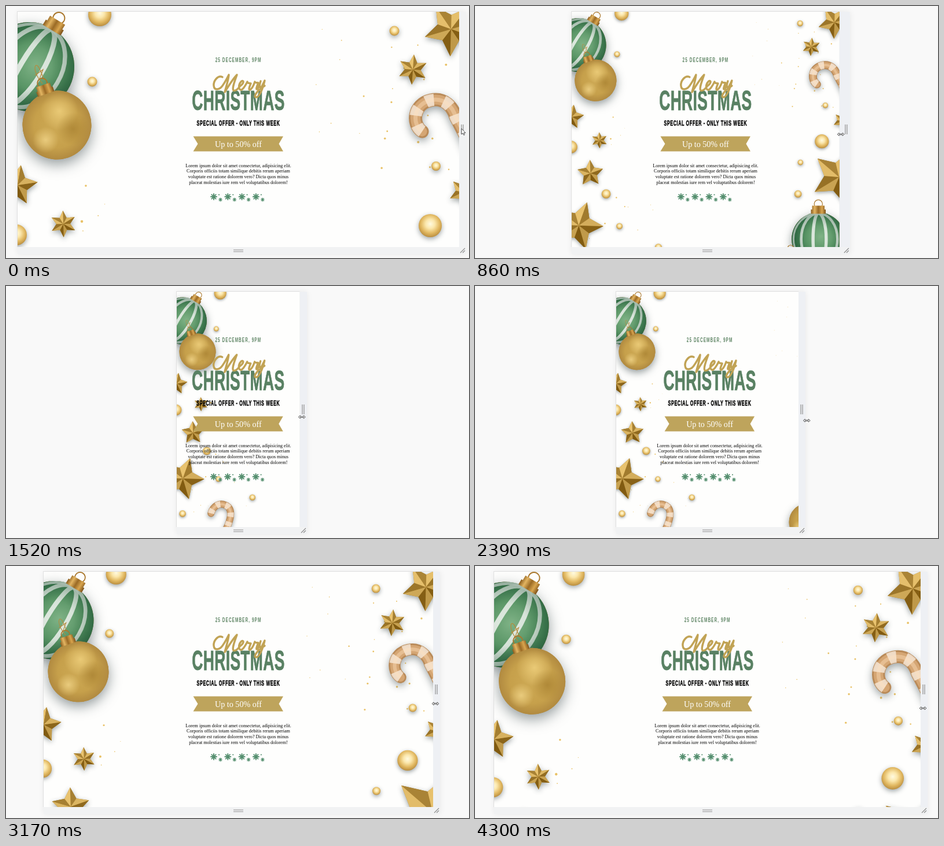
Recreate the animation shown at these times as an HTML page with a canvas. Size 800x436 px, loop 4340 ms.

```html
<!DOCTYPE html>
<html lang="en">
<head>
<meta charset="utf-8">
<title>Responsive Christmas flyer</title>
<style>
  html, body { margin: 0; width: 100%; height: 100%; overflow: hidden; background: #f9f9f9; }
  canvas, svg { position: absolute; left: 0; top: 0; }
  .condensed { font-family: "Liberation Sans", Arial, sans-serif; font-weight: bold; }
  .serif { font-family: "Liberation Serif", "Times New Roman", serif; }
  text { text-anchor: middle; }
</style>
</head>
<body>
<canvas id="stage" width="800" height="436"></canvas>
<svg width="800" height="436">
  <defs>
    <path id="flower" d="M-5 0H5M0-5V5M-3.6-3.6 3.6 3.6M-3.6 3.6 3.6-3.6" stroke="#558f6f" stroke-width="2" stroke-linecap="round"/>
    <g id="sprig">
      <use href="#flower"/>
      <use href="#flower" transform="translate(11.5 5) scale(.58)"/>
      <circle cx="9" cy="-3.5" r="1.1" fill="#558f6f"/>
    </g>
    <g id="pair">
      <use href="#sprig"/>
      <use href="#sprig" x="24.3"/>
    </g>
  </defs>
  <g id="copy">
    <g class="condensed" transform="scale(.55 1)">
      <text y="97" font-size="11.6" letter-spacing="2" fill="#5c8362">25 DECEMBER, 9PM</text>
      <text y="180" font-size="48" letter-spacing=".7" fill="#598163" stroke="#598163">CHRISTMAS</text>
      <text y="207" font-size="13" letter-spacing="1.2" stroke="#000" stroke-width=".5">SPECIAL OFFER - ONLY THIS WEEK</text>
    </g>
    <path role="img" aria-label="Merry" transform="translate(-401.5)" fill="none" stroke="#c1a355" stroke-width="3.4" stroke-linecap="round" stroke-linejoin="round"
      d="M374 123C366 119 358 130 359 138C360 147 369 145 374 138C379 131 382 125 385 119C384 130 380 140 378 149C386 136 392 126 399 119C396 128 390 142 393 146C397 148 402 142 405 138C412 133 411 128 407 130C400 137 402 146 407 145C411 143 414 137 417 131C417 135 422 133 423 134C421 139 418 146 422 145C426 142 428 137 430 131C431 134 435 132 436 133C434 138 431 145 434 144C437 142 438 137 440 130C437 139 438 144 442 139L447 129C444 142 438 158 432 158C426 156 436 145 447 138"/>
    <path d="M-78 225.5H77.5L70 238.5L77.5 251.5H-78L-70 238.5Z" fill="#bea45c"/>
    <text class="serif" y="244" font-size="14.1" fill="#fff">Up to 50% off</text>
    <g class="serif" font-size="8.1">
      <text y="278.5">Lorem ipsum dolor sit amet consectetur, adipisicing elit.</text>
      <text y="288.3">Corporis officiis totam similique debitis rerum aperiam</text>
      <text y="297.9">voluptate est ratione dolorem vero? Dicta quos minus</text>
      <text y="307.6">placeat molestias iure rem vel voluptatibus dolorem!</text>
    </g>
    <use href="#pair" x="-42.5" y="330"/>
    <use href="#pair" x="6.1" y="330"/>
  </g>
</svg>
<script>
const ctx = document.getElementById('stage').getContext('2d');
const copy = document.getElementById('copy');
const LOOP = 4340, TOP = 10, BOTTOM = 417, TAU = Math.PI * 2;
const BASE = 763, MIN_ART = 404;  // the artwork scales with the page, down to a minimum width

// Left edge of the page while its handle is dragged: [time, x]
const DRAG = [[0, 20], [340, 20], [860, 167], [1520, 295], [1820, 300], [2170, 300],
  [2730, 158], [3170, 65], [3520, 65], [3860, 16.5], [4170, 16.5], [4300, 33], [LOOP, 33]];

function leftAt(t) {
  const i = DRAG.findIndex(k => k[0] >= t);
  if (i < 1) return DRAG[i ? DRAG.length - 1 : 0][1];
  const [t0, x0] = DRAG[i - 1], [t1, x1] = DRAG[i];
  return x0 + (x1 - x0) * (t - t0) / (t1 - t0);
}
const rightAt = t => 803 - leftAt(t);

let seed = 7;
const random = () => (seed = seed * 16807 % 2147483647) / 2147483647;

// Gold specks, denser and larger towards the side they drift from
function dust(count, x, y, spreadX, spreadY) {
  return Array.from({ length: count }, () => {
    const away = random() ** 1.4;
    return [x + spreadX * away, y + spreadY * random(), .6 + 2.4 * random() * (1 - away)];
  });
}
const DUST = [...dust(26, 745, 15, -250, 280), ...dust(16, 50, 530, 210, 190), ...dust(5, 110, 278, 65, 110)];

function shadow(strength, scale) {
  ctx.shadowColor = `rgba(40,55,60,${strength})`;
  ctx.shadowBlur = 14 * scale;
  ctx.shadowOffsetY = 5 * scale;
}

function disc(x, y, r, fill) {
  ctx.fillStyle = fill;
  ctx.beginPath();
  ctx.arc(x, y, r, 0, TAU);
  ctx.fill();
}

function spread(gradient, colors) {
  colors.forEach((c, i) => gradient.addColorStop(i / (colors.length - 1), c));
  return gradient;
}
const glow = (x, y, r, ...colors) => spread(ctx.createRadialGradient(x, y, 0, x, y, r), colors);

function spot(x, y, r, rgb, alpha) {
  disc(x, y, r, glow(x, y, r, `rgba(${rgb},${alpha})`, `rgba(${rgb},0)`));
}

function pearl(x, y, r, scale) {
  shadow(.45, scale * .6);
  disc(x, y, r, glow(x, y - r * .15, r * 1.2, '#fffae0', '#fbe7ac', '#e2b962', '#b5883a'));
  shadow(0, 0);
}

function star(x, y, r, turn, tips, scale) {
  const step = Math.PI / tips;
  const outline = Array.from({ length: tips * 2 }, (_, i) => {
    const a = turn + i * step, d = i % 2 ? r * .52 : r;
    return [x + Math.cos(a) * d, y + Math.sin(a) * d];
  });
  const poly = (points, fill) => {
    ctx.beginPath();
    points.forEach(p => ctx.lineTo(...p));
    ctx.closePath();
    ctx.fillStyle = fill;
    ctx.fill();
  };
  shadow(.45, scale * .7);
  poly(outline, '#b08430');
  shadow(0, 0);
  outline.forEach((p, i) => {
    const light = .48 + .2 * Math.cos(turn + i * step + 2.2) + (i % 2 ? .3 : -.3);
    poly([[x, y], p, outline[(i + 1) % outline.length]],
      `rgb(${130 + 105 * light},${92 + 105 * light},${18 + 95 * light})`);
  });
}

// The cap sits on top of a ball whose centre is the origin
function cap(r, w) {
  const h = w * .58;
  ctx.strokeStyle = '#a9772c';
  ctx.lineWidth = 2;
  ctx.beginPath();
  ctx.arc(0, -r - h, w * .28, 0, TAU);
  ctx.stroke();
  ctx.fillStyle = spread(ctx.createLinearGradient(-w / 2, 0, w / 2, 0),
    ['#8a5c1d', '#e3b562', '#9a6a25', '#d9a54e', '#7c5119']);
  ctx.fillRect(-w * .42, -r - h * .8, w * .84, h * .5);
  ctx.fillRect(-w / 2, -r - h * .35, w, h * .5);
}

function ornament(x, y, r, tilt, capWidth, scale, paint) {
  ctx.save();
  ctx.translate(x, y);
  ctx.rotate(tilt);
  shadow(.5, scale * 1.7);
  disc(0, 0, r, '#b48c40');
  shadow(0, 0);
  paint(r);
  cap(r, capWidth);
  ctx.restore();
}

function paintGreen(r) {
  disc(0, 0, r, glow(r * .1, -r * .1, r * 1.1, '#80b387', '#5c9868', '#2f6c45'));
  ctx.strokeStyle = 'rgba(238,243,238,.88)';
  for (let lon = -1.2; lon < 1.2; lon += .5) {
    ctx.lineWidth = r * .12 * Math.cos(lon * .8);
    ctx.beginPath();
    ctx.ellipse(0, 0, Math.abs(Math.sin(lon)) * r, r * .97, 0, -Math.PI / 2, Math.PI / 2, lon < 0);
    ctx.stroke();
  }
  disc(0, 0, r, glow(0, 0, r, 'rgba(20,70,40,0)', 'rgba(20,70,40,.03)', 'rgba(20,70,40,.35)'));
}

function paintGold(r) {
  disc(0, 0, r, glow(0, 0, r, '#cda955', '#caa550', '#c6a04b', '#b18a40'));
  spot(r * .2, -r * .36, r * .55, '247,217,134', .7);
  spot(r * .4, r * .26, r * .48, '152,112,35', .5);
  spot(-r * .45, r * .3, r * .38, '247,220,145', .7);
}

function cane(outline, scale) {
  const path = new Path2D(outline);
  const line = (color, width) => {
    ctx.strokeStyle = color;
    ctx.lineWidth = width;
    ctx.stroke(path);
  };
  ctx.lineCap = 'round';
  shadow(.45, scale);
  line('#b98a58', 23);
  shadow(0, 0);
  line('#d5a674', 17);
  ctx.lineCap = 'butt';
  ctx.setLineDash([14, 17]);
  line('rgba(250,238,226,.75)', 21);
  ctx.setLineDash([]);
  line('rgba(255,225,190,.4)', 7);
}

function hangingString() {
  ctx.strokeStyle = '#b58a3c';
  ctx.lineWidth = 1.2;
  ctx.stroke(new Path2D('M43 124C32 112 28 98 31 93C36 90 40 104 46 118M30 110L44 100L38 116'));
}

function artwork(scale) {
  const drawAll = (draw, ...items) => items.forEach(item => draw(...item, scale));
  DUST.forEach(d => disc(...d, '#e9c267'));

  ornament(21, 95, 77, .54, 36, scale, paintGreen);
  hangingString();
  ornament(68, 196, 59.5, -.335, 30, scale, paintGold);
  ornament(703, 649, 76, 0, 42, scale, paintGreen);
  ornament(624, 752, 60, 0, 30, scale, paintGold);

  drawAll(cane,
    ['M699 207C681 195 683 160 714 153C738 148 752 165 757 182L790 245'],
    ['M112 724C118 700 140 688 158 697C182 706 178 735 168 760L150 800']);
  drawAll(star,
    [0, 300, 35, -.15, 5], [79, 367, 23, -1.6, 6], [53, 461, 38, -1.6, 5], [20, 610, 70, .03, 5],
    [749, 30, 47, 1.6, 5], [683, 100, 26, -1.5, 6], [770, 312, 25, 2.7, 5], [762, 472, 81, -2.43, 5]);
  drawAll(pearl,
    [142, 5, 20], [129, 121, 8.5], [-2, 386, 18], [98, 520, 13], [136, 612, 9], [247, 672, 10],
    [19, 725, 11], [651, 33, 8.5], [723, 267, 8], [713, 370, 20], [652, 430, 8], [645, 520, 10.5]);
}

function grip(...lines) {
  ctx.beginPath();
  for (const [x, y, dx, dy] of lines) {
    ctx.moveTo(x, y);
    ctx.lineTo(x + dx, y + dy);
  }
  ctx.strokeStyle = '#8f8f8f';
  ctx.lineWidth = 1.2;
  ctx.stroke();
}

function pointer(x, y, arrow) {
  const shape = new Path2D(arrow
    ? 'M0-4V6L2.3 4L4 7.5L5.5 6.8L4 3.5H7Z'
    : 'M-6 0L-3-2.500V-.8H3V-2.500L6 0L3 2.500V.8H-3V2.500Z');
  ctx.save();
  ctx.translate(x, y);
  ctx.fillStyle = '#fff';
  ctx.strokeStyle = '#333';
  ctx.lineWidth = .8;
  ctx.fill(shape);
  ctx.stroke(shape);
  ctx.restore();
}

function draw(t) {
  const left = leftAt(t), edge = rightAt(t) + 12;
  // The layout runs slightly ahead of the panel, the pointer further ahead
  const width = rightAt(t + 16) - leftAt(t + 16);
  const right = Math.min(rightAt(t), left + width);
  const hover = t >= 60;

  ctx.fillStyle = '#f9f9f9';
  ctx.fillRect(0, 0, 800, 436);
  ctx.save();
  ctx.shadowColor = 'rgba(0,0,0,.07)';
  ctx.shadowBlur = 10;
  ctx.fillStyle = '#f1f2f3';
  ctx.fillRect(left, TOP, edge - left, 419);
  ctx.restore();
  ctx.fillStyle = hover ? '#eef0f4' : '#f1f2f3';
  ctx.fillRect(right, TOP, edge - right, BOTTOM - TOP);
  ctx.fillStyle = '#e0e0e0';
  ctx.fillRect(left - 1, TOP - 1, right - left + 1, BOTTOM - TOP + 1);
  ctx.fillStyle = '#fefefd';
  ctx.fillRect(left, TOP, right - left, BOTTOM - TOP);

  const scale = Math.max(MIN_ART, width) / BASE;
  ctx.save();
  ctx.beginPath();
  ctx.rect(left, TOP, right - left, BOTTOM - TOP);
  ctx.clip();
  ctx.translate(left, TOP);
  ctx.scale(scale, scale);
  artwork(scale);
  ctx.restore();

  grip([393, 422, 17, 0], [393, 425, 17, 0],
    [edge - 8, 205, 0, 17], [edge - 5, 205, 0, 17],
    [edge - 10, 427, 8, -8], [edge - 6, 427, 4, -4]);
  pointer(rightAt(t + 40) + 4, 216 + t * .007, !hover);
  copy.setAttribute('transform', `translate(${left + width / 2})`);
}

const start = performance.now();
function frame(now) {
  draw(Math.max(0, now - start) % LOOP);
  requestAnimationFrame(frame);
}
requestAnimationFrame(frame);
</script>
</body>
</html>
```
